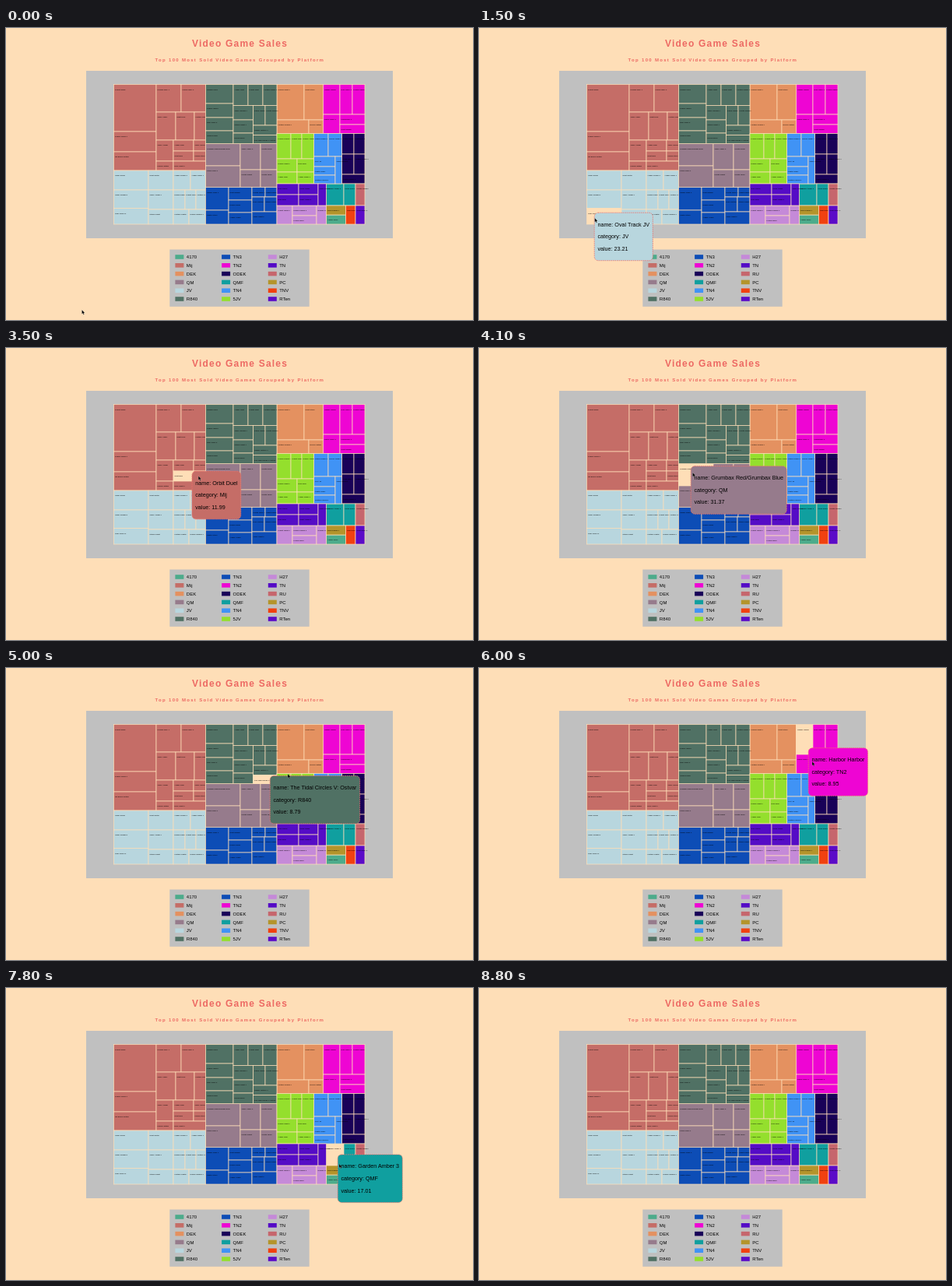
An HTML page for the animation above (8.9 s loop, 600 by 375 pixels).

```html
<!DOCTYPE html>
<html lang="en">
<head>
<meta charset="utf-8">
<title>Video Game Sales</title>
<style>
html, body { margin: 0; width: 100%; height: 100%; overflow: hidden; background: #fedeb7; }
svg { display: block; width: 100vw; height: 100vh; font-family: "Liberation Sans", Arial, sans-serif; }
.head { font-weight: bold; fill: #ed6963; text-anchor: middle; }
.tile { stroke: #fedeb7; stroke-width: .7; }
.label { font-size: 2.3px; }
.key { font-size: 6px; }
.tip text { font-size: 7.2px; }
.tip rect { stroke: #f0706a; stroke-width: .8; stroke-dasharray: 1.6 1; }
</style>
</head>
<body>
<svg id="stage" viewBox="0 0 600 375">
  <text class="head" x="300.6" y="24.3" font-size="12" letter-spacing="1.2">Video Game Sales</text>
  <text class="head" x="300.4" y="43" font-size="6" letter-spacing="1.31">Top 100 Most Sold Video Games Grouped by Platform</text>
  <rect x="103" y="55" width="394" height="215" fill="#c0c0c0"/>
  <rect x="210.3" y="284.5" width="179.4" height="73.3" fill="#c0c0c0"/>
</svg>
<script>
const LOOP = 8900, STEP = 100, LAG = 100, PAPER = '#fedeb7';
const stage = document.getElementById('stage');

function add(parent, tag, attrs, text) {
  const el = document.createElementNS('http://www.w3.org/2000/svg', tag);
  for (const k in attrs) el.setAttribute(k, attrs[k]);
  if (text) el.textContent = text;
  parent.appendChild(el);
  return el;
}

let seed = 7;
const rand = () => (seed = (seed * 16807) % 2147483647) / 2147483647;
const words = ['Amber', 'Racer', 'Moss', 'Castle', 'Orbit', 'Duel', 'Lantern', 'Rally',
  'Island', 'Storm', 'Garden', 'Planet', 'Puzzle', 'Night', 'Valley', 'Harbor'];
const pick = () => words[Math.floor(rand() * words.length)];

// Splits list children with the cut positions between them.
const X = (...parts) => ({ axis: 0, parts });
const Y = (...parts) => ({ axis: 1, parts });

// name, colour, box (left, top, right, bottom), split
const groups = [
  ['4170', '#4cab8b', [411.5, 240, 436.5, 252], 1],
  ['Mij', '#c56d67', [138.5, 72.5, 256.5, 183],
    X(Y(1, 133, 1, 159, 'Mij Beach Outing|32.77'), 193,
      Y(X(1, 225, 1), 108, X(1, 218, 1, 242, 1), 144,
        X(Y(1, 171, 1), 215, Y(X(1, 241, 1), 158, X(1, 241, 1), 171, 1))))],
  ['DEK', '#e49160', [348, 72.5, 407.5, 135.5], Y(X(1, 383, 1), 118, X(1, 389, 1))],
  ['QM', '#967b8c', [256.5, 148.5, 348, 204.5],
    X(Y('Grumbax Red/Grumbax Blue|31.37', 177, 1), 301, Y(X(1, 327, 1), 182, X(1, 327, 1)))],
  ['JV', '#b8d6de', [138.5, 183, 256.5, 252],
    X(Y(1, 208, 1, 231.5, 'Oval Track JV|23.21'), 183,
      Y(X(1, 215, 1, 237, 1), 208, X(1, 215, 1, 230, 1, 244, 1), 233, X(1, 215, 1, 235, 1)))],
  ['R840', '#507164', [256.5, 72.5, 348, 148.5],
    X(Y(1, 97, 1, 115, 1, 132, 1), 292,
      Y(X(1, 311, 1, 330, 1), 99.5,
        X(Y(1, 118, 1, 135, 1), 317.5, Y(X(1, 333, 1), 125, 1, 137.5, 'The Tidal Circles V: Ostvar|8.79'))))],
  ['TN3', '#0d4db6', [256.5, 204.5, 348, 252],
    X(Y(1, 234, 1), 286, Y(1, 221, 1, 237, 1), 316,
      Y(X(1, 333, 1), 217, X(1, 332, 1), 236, 1))],
  ['TN2', '#ee05d3', [407.5, 72.5, 461, 135.5],
    Y(X(1, 429, 1, 445, 1), 111, X(1, 429, Y(1, 124, 1)))],
  ['ODEK', '#190158', [431.5, 135.5, 461, 200],
    Y(X(1, 447, 1), 162, X(1, 447, 1), 188, 1)],
  ['QMF', '#109f9f', [411.5, 200, 449, 228], X(1, 434, 1)],
  ['TN4', '#4093f5', [395.5, 135.5, 431.5, 200],
    Y(X(1, 414, 1), 165, X(Y('KILA 16|8.57', 178, 1, 189, 1), 423, 1))],
  ['5JV', '#94df2d', [348, 135.5, 395.5, 200],
    Y(X(1, 366, 1, 380, 1), 168, X(Y(1, 185, 1), 374, Y(1, 185, 1)))],
  ['H27', '#c58ad8', [348, 228, 411.5, 252], X(1, 368, Y(1, 241, 1), 399, 1)],
  ['TN', '#550cc6', [348, 200, 411.5, 228], X(Y(1, 214, 1), 376, Y(1, 214, 1), 401, 1)],
  ['RU', '#c6666d', [449, 200, 461, 228], 1],
  ['PC', '#b4942b', [411.5, 228, 436.5, 240], 1],
  ['TNV', '#f04110', [436.5, 228, 449, 252], 1],
  ['RTen', '#5a0bc8', [449, 228, 461, 252], 1]
];

const tiles = [];

function addTile(box, leaf, group, fill) {
  const [x, y, r, b] = box;
  let name = pick() + ' ' + pick() + (rand() > .6 ? ' ' + Math.ceil(rand() * 4) : '');
  let value = (8 + rand() * 12).toFixed(2);
  if (leaf !== 1) [name, value] = leaf.split('|');
  const rect = add(stage, 'rect', { class: 'tile', x, y, width: r - x, height: b - y, fill });
  add(stage, 'text', { class: 'label', x: x + 1.6, y: y + 7.3 }, name);
  tiles.push({ box, name, value, group, fill, rect });
}

function layout(node, box, group, fill) {
  if (!node.parts) return addTile(box, node, group, fill);
  const { axis, parts } = node;
  let from = box[axis];
  for (let i = 0; i < parts.length; i += 2) {
    const to = i + 1 < parts.length ? parts[i + 1] : box[axis + 2];
    const part = box.slice();
    part[axis] = from;
    part[axis + 2] = to;
    layout(parts[i], part, group, fill);
    from = to;
  }
}

groups.forEach(([name, fill, box, split], i) => {
  layout(split, box, name, fill);
  const x = 217.4 + 59.7 * Math.floor(i / 6), y = 291.2 + 10.8 * (i % 6);
  add(stage, 'rect', { x, y, width: 11, height: 5.6, fill });
  add(stage, 'text', { class: 'key', x: x + 14.4, y: y + 5 }, name);
});

const tip = add(stage, 'g', { class: 'tip' });
const tipBox = add(tip, 'rect', { height: 61.5, rx: 5 });
const lines = [17.6, 33.2, 48.8].map(y => add(tip, 'text', { x: 4.2, y }));
const cursor = add(stage, 'path', {
  d: 'M0 0V5.2L1.2 4.2L2.1 6.2L3 5.8L2.1 3.9H3.7Z',
  fill: '#000', stroke: '#fff', 'stroke-width': .3, 'stroke-opacity': .6
});

// time, x, y of the pointer
const path = [
  [0, 97.5, 362], [300, 60, 330], [500, 25, 290], [900, 134, 246], [1200, 146, 246],
  [1400, 149, 244.5], [1500, 148.7, 244], [1800, 150, 235], [2200, 160, 195],
  [2500, 180, 174.7], [2700, 181, 174], [3200, 225, 168], [3700, 262, 162],
  [4000, 273, 159], [4100, 274.5, 160], [4500, 310, 150], [4900, 340, 145.7],
  [5000, 362, 136], [5400, 380, 105], [5800, 420, 100], [6300, 440, 150],
  [6700, 432, 172], [6900, 404.2, 168.7], [7000, 403, 170.5], [7500, 425, 212],
  [8000, 430, 235], [8300, 456, 240], [8500, 520, 290], [8700, 592, 351], [8800, 620, 380]
];

function pointer(t) {
  t = Math.max(0, t);
  const i = path.findIndex(p => p[0] >= t);
  if (i < 1) return path[0].slice(1);
  const [t0, x0, y0] = path[i - 1], [t1, x1, y1] = path[i];
  const k = (t - t0) / (t1 - t0);
  return [x0 + (x1 - x0) * k, y0 + (y1 - y0) * k];
}

function draw(t) {
  const [cx, cy] = pointer(t), [hx, hy] = pointer(t - LAG);
  cursor.setAttribute('transform', `translate(${cx} ${cy})`);
  let hit = null;
  for (const tile of tiles) {
    const [x, y, r, b] = tile.box;
    const over = hx >= x && hx < r && hy >= y && hy < b;
    if (over) hit = tile;
    tile.rect.setAttribute('fill', over ? PAPER : tile.fill);
  }
  tip.style.display = hit ? '' : 'none';
  if (!hit) return;
  lines[0].textContent = 'name: ' + hit.name;
  lines[1].textContent = 'category: ' + hit.group;
  lines[2].textContent = 'value: ' + hit.value;
  const wide = Math.max(...lines.map(l => l.getComputedTextLength()));
  tipBox.setAttribute('width', wide + 8.4);
  tipBox.setAttribute('fill', hit.fill);
  tip.setAttribute('transform', `translate(${hx - .8} ${hy - 7.3})`);
}

const start = performance.now();
let shown = -1;
function tick() {
  const t = Math.floor(((performance.now() - start) % LOOP) / STEP) * STEP;
  if (t !== shown) draw(shown = t);
  requestAnimationFrame(tick);
}
tick();
</script>
</body>
</html>
```
